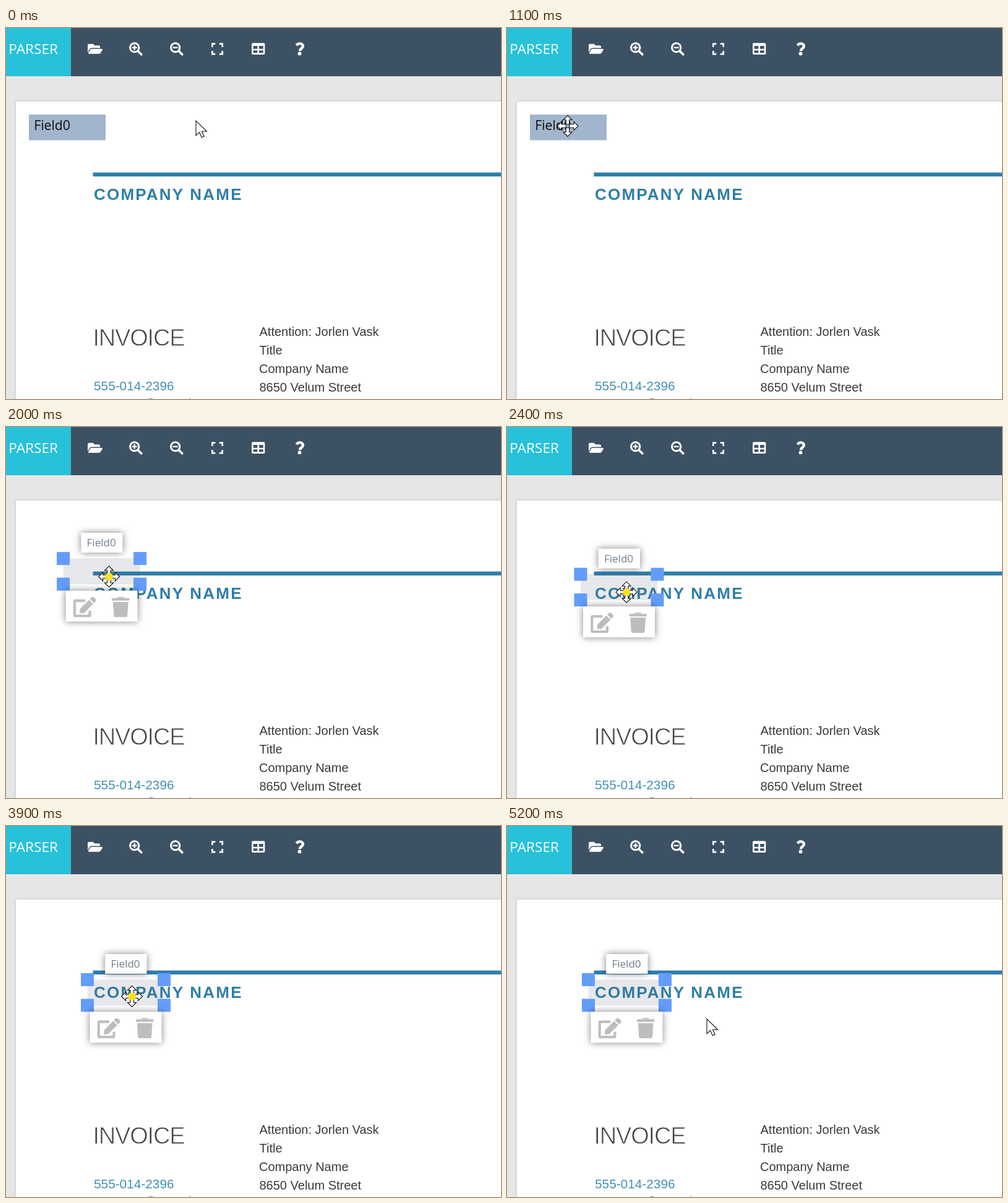
Write an HTML page that moves like this. It is 800 px wide and 600 px high and loops after 5700 ms.

```html
<!DOCTYPE html>
<html lang="en">
<head>
<meta charset="utf-8">
<title>Field placement</title>
<style>
  html, body { margin: 0; width: 100%; height: 100%; overflow: hidden; background: #fff; }
  svg { display: block; }
  .ui { font-family: "Open Sans", "Noto Sans", sans-serif; }
  .doc { font-family: "Liberation Sans", Arial, sans-serif; }
  .shade { fill: #fff; filter: drop-shadow(0 0 6px rgba(0, 0, 0, .5)); }
  .line { fill: none; stroke: #fff; }
  .pointer { fill: #fff; stroke: #111; stroke-width: 1.1; }
</style>
</head>
<body>
<svg width="800" height="600" viewBox="0 0 800 600">
  <defs>
    <filter id="soft" x="-5%" y="-5%" width="110%" height="110%"><feGaussianBlur stdDeviation="2"/></filter>
    <filter id="scan" x="-5%" y="-20%" width="110%" height="140%"><feGaussianBlur stdDeviation=".5"/></filter>
    <g id="lens" class="line">
      <circle cx="208" cy="208" r="172" stroke-width="72"/>
      <path d="M340 340L474 474" stroke-width="88" stroke-linecap="round"/>
      <path d="M112 208H304" stroke-width="56"/>
    </g>
    <path id="arm" d="M-2.7-2.7V-10H-7L0-17L7-10H2.7V-2.7Z"/>
  </defs>

  <!-- Page -->
  <rect y="78" width="800" height="522" fill="#e7e6e6"/>
  <rect x="16" y="119" width="800" height="500" fill="#999" opacity=".5" filter="url(#soft)"/>
  <rect x="16" y="119" width="784" height="481" fill="#fff"/>
  <g class="doc" font-size="20" fill="#3a3a3a">
    <g fill="#2f7ea8" filter="url(#scan)">
      <rect x="140.5" y="233.7" width="670" height="6.4"/>
      <text x="142" y="278" font-size="26" font-weight="700" letter-spacing="2.2">COMPANY NAME</text>
    </g>
    <text x="140.5" y="514" font-size="38" letter-spacing="-1.2" fill="#444" stroke="#fff" stroke-width=".9">INVOICE</text>
    <text x="409.5" y="498">Attention: Jorlen Vask</text>
    <text x="409.5" y="528">Title</text>
    <text x="409" y="558">Company Name</text>
    <text x="409.5" y="588">8650 Velum Street</text>
    <g font-size="20.8" fill="#438fb5">
      <text x="142" y="586">555-014-2396</text>
      <text x="142" y="614">to_query@sample.test</text>
    </g>
  </g>

  <!-- Header -->
  <rect width="800" height="78" fill="#3c5163"/>
  <rect width="105" height="78" fill="#27c1d9"/>
  <text class="ui" x="4.3" y="42" font-size="22.6" fill="#fff">PARSER</text>
  <g fill="#fff">
    <path transform="translate(132 23) scale(.0417)"
      d="M573 292L500 416Q480 448 445 448H45Q10 445 24 412L97 288Q118 256 152 256H552Q582 262 573 292ZM152 224H480V176Q480 128 432 128H272L208 64H48Q0 64 0 112V390L69 272Q100 224 152 224Z"/>
    <g transform="translate(199 23) scale(.0417)">
      <use href="#lens"/>
      <path class="line" d="M208 112V304" stroke-width="56"/>
    </g>
    <use href="#lens" transform="translate(265 23) scale(.0417)"/>
    <path class="line" transform="translate(332 23) scale(.0425)" stroke-width="64"
      d="M32 180V64H148M300 64H416V180M416 332V448H300M148 448H32V332"/>
    <g class="line" transform="translate(397 23) scale(.0417)" stroke-width="64">
      <rect x="32" y="64" width="448" height="384" rx="16"/>
      <path d="M32 112H480M32 288H480M256 112V448"/>
    </g>
    <g transform="translate(466.5 23) scale(.0417)">
      <path class="line" d="M68 124C106 72 146 51 200 51C266 51 322 96 322 152C322 245 204 232 204 344" stroke-width="106"/>
      <circle cx="192" cy="443" r="69"/>
    </g>
  </g>

  <!-- Field before it is selected -->
  <g id="idle" class="ui">
    <rect x="37" y="140" width="124" height="41.5" fill="#a1b5cd"/>
    <text x="45.3" y="165" font-size="21.2" fill="#111">Field0</text>
  </g>

  <!-- Selected field, its corner at 0,0 -->
  <g id="active">
    <rect width="124" height="41.5" fill="#506070" opacity=".14"/>
    <g id="handles" fill="#649cfb"></g>
    <rect class="shade" x="28.7" y="-41.5" width="67.3" height="32"/>
    <text class="ui" x="38" y="-19.3" font-size="17" fill="#6f7d8d">Field0</text>
    <rect class="shade" x="4" y="52" width="116" height="50"/>
    <g fill="#bdbdbd">
      <g transform="translate(16.2 62) scale(.0642)">
        <path d="M300 96H48Q32 96 32 112V464Q32 480 48 480H400Q416 480 416 464V346" fill="none" stroke="#bdbdbd" stroke-width="64"/>
        <path d="M396 77L500 180L274 406L182 416Q158 417 160 394L170 302ZM565 60L516 11Q488 -9 461 11L418 54L522 158L565 115Q585 88 565 60Z"/>
      </g>
      <g transform="translate(78.3 62) scale(.0642)">
        <rect y="32" width="448" height="64" rx="16"/>
        <path d="M136 32L152 0H296L312 32ZM32 128L53 467Q58 512 101 512H347Q390 512 395 467L416 128Z"/>
      </g>
    </g>
  </g>

  <!-- Pointers -->
  <path id="arrow" class="pointer" d="M0 0V24L5.5 18.7L9.3 27L13.3 25.2L9.6 17.3H17.5Z"/>
  <g id="move" class="pointer">
    <use href="#arm"/>
    <use href="#arm" transform="rotate(90)"/>
    <use href="#arm" transform="rotate(180)"/>
    <use href="#arm" transform="rotate(270)"/>
    <circle id="press" r="6.3" fill="#fbe01c" stroke="none"/>
  </g>
</svg>
<script>
const LOOP = 5700, STEP = 100, SELECT = 1600, RELEASE = 4300;
const LAG = 40; // the dragged field trails the pointer
const home = [37, 140], grab = [72, 27], size = [124, 41.5];

const smooth = k => k * k * (3 - 2 * k);
const settle = k => 1 - (1 - k) ** 1.5;
const clamp = k => Math.max(0, Math.min(1, k));
const el = id => document.getElementById(id);

const moves = [
  { from: 400, to: 1100, end: [98, 158.5], ease: smooth },
  { from: SELECT, to: 2000, end: [166.5, 242], ease: smooth },
  { from: 2000, to: 2700, end: [203.5, 277], ease: settle },
  { from: 3800, to: 3850, end: [203.5, 275.5], ease: smooth },
  { from: 4700, to: 5200, end: [323, 312], ease: smooth }
];

function pointerAt(t) {
  return moves.reduce((pos, { from, to, end, ease }) => {
    const k = ease(clamp((t - from) / (to - from)));
    return pos.map((v, i) => v + (end[i] - v) * k);
  }, [307, 150]);
}

function fieldAt(t) {
  if (t < SELECT) return home;
  const held = pointerAt(Math.min(t - LAG, RELEASE));
  return held.map((v, i) => Math.max(home[i], v - grab[i]));
}

const show = (id, on) => el(id).style.display = on ? "" : "none";
const place = (id, [x, y]) => el(id).setAttribute("transform", `translate(${x} ${y})`);

el("handles").innerHTML = [0, size[0]].flatMap(x => [0, size[1]].map(y =>
  `<rect x="${x - 10.5}" y="${y - 10.5}" width="21" height="21"/>`)).join("");

function draw(t) {
  const pointer = pointerAt(t), field = fieldAt(t);
  const over = pointer.every((v, i) => v >= field[i] && v <= field[i] + size[i]);
  const selected = t >= SELECT;

  show("idle", !selected);
  show("active", selected);
  show("arrow", !over);
  show("move", over);
  place("active", field);
  place("arrow", pointer);
  place("move", pointer);
  el("press").setAttribute("opacity", selected ? clamp((RELEASE + 2 * STEP - t) / (3 * STEP)) : 0);
}

const start = performance.now();
function tick() {
  const t = (performance.now() - start) % LOOP;
  draw(Math.floor(t / STEP) * STEP);
  requestAnimationFrame(tick);
}
tick();
</script>
</body>
</html>
```
